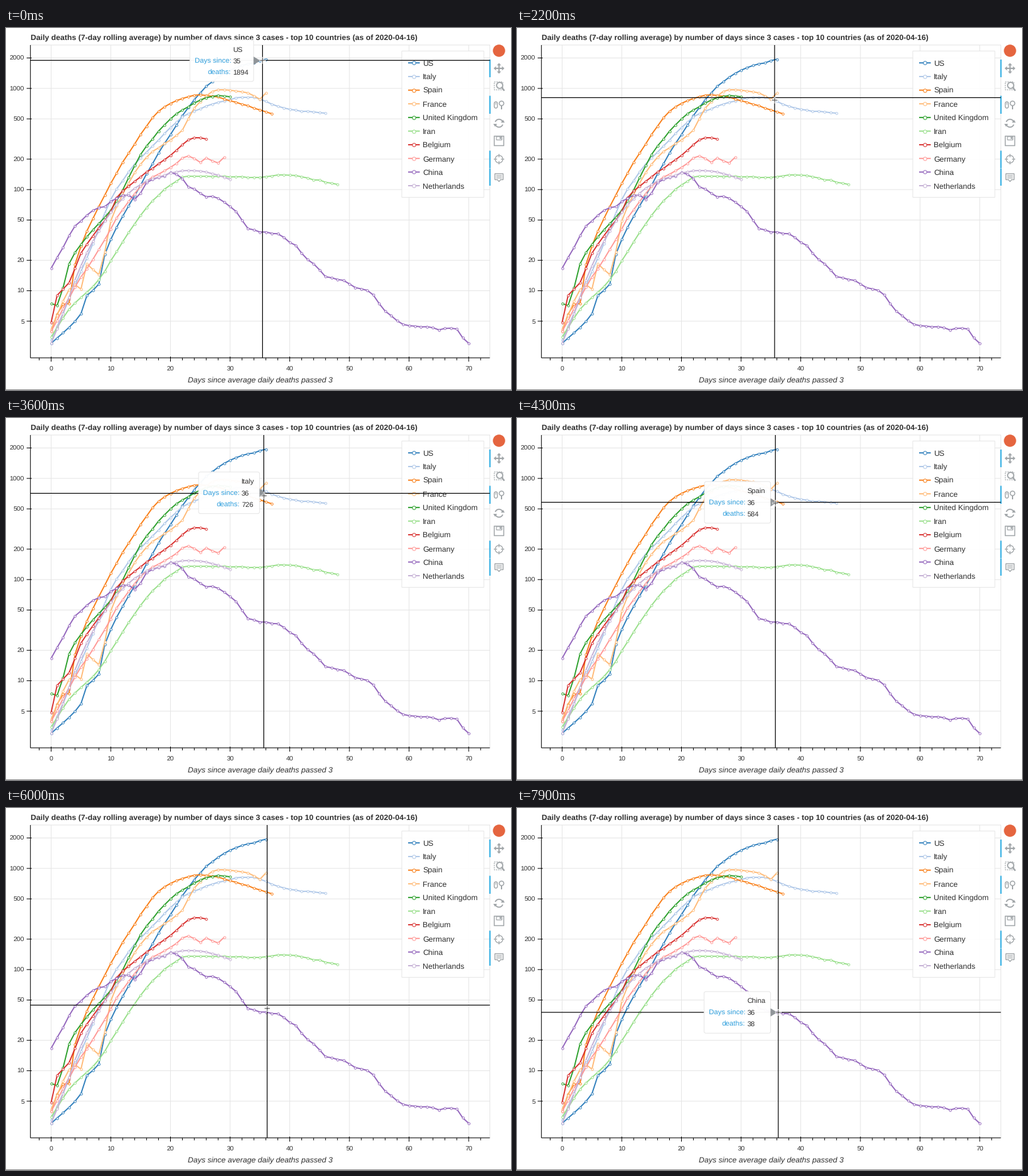
Recreate the animation shown at these times as a matplotlib script. Size 800x574 px, loop 8 s.

```python
import numpy as np
import matplotlib as mpl
import matplotlib.pyplot as plt
from matplotlib.animation import FuncAnimation
from matplotlib.patches import Arc, Circle, FancyBboxPatch, Polygon, Rectangle

W, H, DPI = 800, 574, 100
PX = 72 / DPI                      # points per pixel
FRAMES, STEP = 80, 100
LEFT, RIGHT, TOP, BOTTOM = 38.7, 766.5, 27, 523
INK, GRID, ICON, BLUE = "#303030", "#e5e5e5", "#a1a6a9", "#26aae1"

mpl.rcParams["font.family"] = "Liberation Sans"
mpl.rcParams["text.hinting"] = "none"
mpl.rcParams["path.snap"] = False

rng = np.random.default_rng(7)
fig = plt.figure(figsize=(W / DPI, H / DPI), dpi=DPI, facecolor="white")
ax = fig.add_axes([0, 0, 1, 1])
ax.set_xlim(0, W)
ax.set_ylim(H, 0)
ax.axis("off")


def day_x(day):
    return 71.5 + 9.45 * day


def deaths_y(n):
    return 577.0 - 160.4 * np.log10(n)


def line(xs, ys, color, width=1.0, z=1, **kw):
    kw.setdefault("solid_capstyle", "butt")
    return ax.plot(xs, ys, color=color, lw=width * PX, zorder=z, **kw)[0]


def text(x, y, s, size=12.25, color=INK, z=5, **kw):
    """Place text with its capitals centred on y."""
    return ax.text(x, y + 0.36 * size, s, fontsize=size * PX, color=color,
                   va="baseline", zorder=z, **kw)


def rect(x0, y0, x1, y1, face, edge="none", z=1, width=1.0, **kw):
    patch = Rectangle((x0, y0), x1 - x0, y1 - y0, fc=face, ec=edge,
                      lw=width * PX, zorder=z, **kw)
    return ax.add_patch(patch)


def poly(points, face=ICON, z=6, **kw):
    return ax.add_patch(Polygon(points, fc=face, zorder=z, **kw))


def ring(x, y, r, width=1.5, face="none"):
    return ax.add_patch(Circle((x, y), r, fc=face, ec=ICON, lw=width * PX, zorder=6))


def draw_axes():
    rect(LEFT, TOP, RIGHT, BOTTOM, "none", GRID)
    for day in range(-2, 73, 2):
        x = day_x(day)
        major = day % 10 == 0 and day >= 0
        line([x, x], [BOTTOM - 2 * major, BOTTOM + 4 + 2 * major], "black", z=4)
        if major:
            line([x, x], [TOP, BOTTOM], GRID)
            text(x, 540.3, str(day), 10.5, ha="center")
    for n in (5, 10, 20, 50, 100, 200, 500, 1000, 2000):
        y = deaths_y(n)
        line([LEFT, RIGHT], [y, y], GRID)
        line([LEFT - 6, LEFT + 2], [y, y], "black", z=4)
        text(29, y, str(n), 10.5, ha="right")
    line([LEFT, LEFT], [TOP, BOTTOM], "black", z=4)
    line([LEFT, RIGHT], [BOTTOM, BOTTOM], "black", z=4)
    line([0, W], [573.5, 573.5], "#8c8c8c", z=4)
    text(39, 15.3, "Daily deaths (7-day rolling average) by number of days since "
         "3 cases - top 10 countries (as of 2020-04-16)", weight="bold")
    text(403, 557.8, "Days since average daily deaths passed 3",
         style="italic", ha="center")
    rect(627, 36.5, 757, 268.5, "white", GRID, z=3.5, alpha=0.95)


def smooth(x, xs, ys):
    """Cubic through key points that never overshoots them."""
    h = np.diff(xs)
    d = np.diff(ys) / h
    turn = d[:-1] * d[1:] <= 0
    mid = np.where(turn, 0, 2 * d[:-1] * d[1:] / np.where(turn, 1, d[:-1] + d[1:]))
    m = np.concatenate([d[:1], mid, d[-1:]])
    k = np.clip(np.searchsorted(xs, x, side="right") - 1, 0, len(h) - 1)
    u = (x - xs[k]) / h[k]
    return (ys[k] + u * h[k] * m[k]
            + u**2 * h[k] * (3 * d[k] - 2 * m[k] - m[k + 1])
            + u**3 * h[k] * (m[k] + m[k + 1] - 2 * d[k]))


rows = iter(55.3 + 21.64 * np.arange(10))


def country(name, color, *keys, wobble=0.6):
    """A curve through (day, height) keys with daily noise, and its legend row."""
    xs, ys = np.array(keys, float).T
    days = np.arange(xs[-1] + 1)
    noise = rng.normal(0, wobble, len(days)) * ~np.isin(days, xs)
    dots = dict(marker="o", mfc="white", mec=color)
    line(day_x(days), smooth(days, xs, ys) + noise, color, 1.9, z=3,
         ms=3.5 * PX, mew=0.9 * PX, solid_joinstyle="round", **dots)
    y = next(rows)
    line([637, 655.5], [y, y], color, 1.9, z=4)
    line([646.2], [y], color, z=4, ms=5.4 * PX, mew=PX, **dots)
    text(660, y, name)


def draw_countries():
    country("US", "#2f7fbc", (0, 500), (5, 453), (6, 424), (8, 406), (9, 359),
            (14, 266), (20, 169), (25, 103), (30, 67), (36, 49.5))
    country("Italy", "#aec7e8", (0, 495), (2, 452), (7, 342), (10, 272), (13, 228),
            (17, 187), (23, 136), (33, 110), (40, 129), (46, 135))
    country("Spain", "#f97f18", (0, 481), (2, 438), (3, 437), (4, 375), (8, 283),
            (14, 184), (19, 125), (25, 106), (32, 121), (37, 136))
    country("France", "#ffbb78", (0, 478), (4, 407), (5, 414), (6, 374), (8, 391),
            (10, 306), (16, 205), (22, 162), (24, 127), (28, 98), (33, 103),
            (35, 113), (36, 103))
    country("United Kingdom", "#2ca02c", (0, 437), (1, 440), (3, 374), (7, 320),
            (10, 289), (16, 187), (22, 130), (28, 107), (30, 109))
    country("Iran", "#98df8a", (0, 490), (3, 446), (8, 399), (10, 369), (15, 297),
            (20, 249), (23, 235), (35, 237), (39, 233), (48, 248))
    country("Belgium", "#d8302f", (0, 467), (1, 424), (3, 404), (5, 357), (10, 291),
            (11, 269), (15, 236), (20, 202), (24, 174), (26, 176))
    country("Germany", "#ff9896", (0, 481), (4, 411), (8, 351), (12, 288), (16, 243),
            (20, 221), (23, 203), (25, 213), (26, 206), (28, 214), (29, 205))
    country("China", "#9467bd", (0, 381), (2, 348), (4, 314), (8, 285), (13, 265),
            (14, 272), (16, 245), (21, 232), (23, 252), (29, 276), (35, 323.5),
            (36, 323.5), (40, 340), (47, 396), (53, 416), (56, 449), (60, 472),
            (67, 476), (70, 500), wobble=2.2)
    country("Netherlands", "#c5b0d5", (0, 500), (2, 453), (5, 377), (9, 306),
            (13, 262), (17, 239), (23, 226), (27, 231), (30, 240))


def draw_toolbar():
    cx = 781
    ax.add_patch(Circle((cx, 36), 9.7, fc="#e5653f", ec="none", zorder=6))
    for y0, y1 in ((50, 78), (107.5, 136), (194.5, 222), (222.5, 250)):
        rect(765.6, y0, 767.6, y1, BLUE, z=6)

    # pan
    y = 64
    line([cx - 6, cx + 6], [y, y], ICON, 2, z=6)
    line([cx, cx], [y - 6, y + 6], ICON, 2, z=6)
    for dx, dy in ((1, 0), (-1, 0), (0, 1), (0, -1)):
        tip = np.array([cx + 8.5 * dx, y + 8.5 * dy])
        back = np.array([cx + 4.7 * dx, y + 4.7 * dy])
        side = 3.4 * np.array([dy, dx])
        poly([tip, back + side, back - side])

    # box zoom
    rect(773.5, 85.5, 787, 98, "none", ICON, z=6, width=1.2, ls=(0, (1.6, 1.3)))
    ring(782, 91, 4.8, 1.8, face="white")
    line([785.5, 789.5], [94.5, 99.5], ICON, 2.4, z=6)

    # wheel zoom
    ax.add_patch(FancyBboxPatch((773.5, 117), 5, 10, fc="none", ec=ICON, zorder=6,
                                lw=1.4 * PX, boxstyle="round,pad=0,rounding_size=2.5"))
    line([776, 776], [118.5, 121.5], ICON, 1.2, z=6)
    ring(785, 119.5, 3.6)
    line([785, 785], [123, 129], ICON, 2, z=6)

    # reset
    for start in (20, 200):
        ax.add_patch(Arc((cx, 151), 12.5, 12.5, theta1=start, theta2=start + 135,
                         ec=ICON, lw=1.8 * PX, zorder=6))
    poly([(784, 150), (790, 150), (787.4, 145.5)])
    poly([(772, 152), (778, 152), (774.6, 156.5)])

    # save
    rect(773.5, 171.5, 788.5, 186.5, "none", ICON, z=6, width=1.5)
    rect(777, 172, 785.5, 177.5, "none", ICON, z=6, width=1.2)
    rect(782, 172.5, 784.5, 176, ICON, z=6)

    # crosshair
    ring(cx, 208, 6, width=1.3)
    for s in (-1, 1):
        line([cx + 3 * s, cx + 8.3 * s], [208, 208], ICON, 1.3, z=6)
        line([cx, cx], [208 + 3 * s, 208 + 8.3 * s], ICON, 1.3, z=6)

    # hover
    poly([(774.5, 231), (787.5, 231), (787.5, 240.5), (783.5, 240.5),
          (781, 243.5), (778.5, 240.5), (774.5, 240.5)], "none", ec=ICON, lw=1.4 * PX)
    for y in (233.7, 235.9, 238.1):
        line([776.5, 785.5], [y, y], ICON, 1, z=6)


class Tooltip:
    def __init__(self, name, day, deaths):
        self.y = deaths_y(deaths)
        y = self.y + 0.5
        edge = day_x(day) - 10
        values = [text(0, y + dy, str(s), 11.3, z=12)
                  for dy, s in ((-18, name), (0, day), (18, deaths))]
        column = edge - 8 - max(v.get_window_extent().width for v in values)
        for v in values:
            v.set_x(column)
        labels = [text(column - 2.5, y + dy, s, 11.3, "#2f9fdd", 12, ha="right")
                  for dy, s in ((0, "Days since:"), (18, "deaths:"))]
        x0 = column - 68
        box = FancyBboxPatch((x0, y - 33), edge - x0, 66, fc="white", ec=GRID,
                             lw=PX, zorder=11, alpha=0.97,
                             boxstyle="round,pad=0,rounding_size=3")
        arrow = poly([(edge, y - 6.5), (edge, y + 6.5), (edge + 10.5, y)],
                     "#909599", 12)
        self.parts = [ax.add_patch(box), arrow, *values, *labels]

    def show(self, on):
        for part in self.parts:
            part.set_visible(on)


draw_axes()
draw_countries()
draw_toolbar()
tips = [Tooltip("US", 35, 1894), Tooltip("Italy", 36, 726),
        Tooltip("Spain", 36, 584), Tooltip("China", 36, 38)]

hline = line([LEFT, RIGHT], [0, 0], "black", 1.2, z=9)
vline = line([0, 0], [TOP, BOTTOM], "black", 1.2, z=9)
pointer = [line([], [], c, w, z=13) for c, w in (("white", 2.6), ("#555555", 1.1))]

# eased moves: start, end, dx, dy
START = np.array([406.4, 51.3])
MOVES = [(1050, 2500, 1.9, 66.5), (3500, 4000, 1, 15.8),
         (4300, 6250, 4.6, 187.4), (6800, 7100, 0, 3)]


def place(t):
    pos = START.copy()
    for t0, t1, dx, dy in MOVES:
        u = np.clip((t - t0) / (t1 - t0), 0, 1)
        pos += u * u * (3 - 2 * u) * np.array([dx, dy])
    return pos


def update(i):
    t = i * STEP
    x, y = place(t)
    hline.set_ydata([y, y])
    vline.set_xdata([x, x])
    # the pointer runs one step ahead of the crosshair
    px, py = place(t + STEP)
    for arm, p in zip((5, 4.2), pointer):
        p.set_data([px - arm, px + arm, np.nan, px, px],
                   [py, py, np.nan, py - arm, py + arm])
    for tip in tips:
        tip.show(abs(tip.y - y) < 2)
    return [hline, vline, *pointer]


anim = FuncAnimation(fig, update, frames=FRAMES, interval=STEP, repeat=True,
                     repeat_delay=0, blit=False)
plt.show()
```
